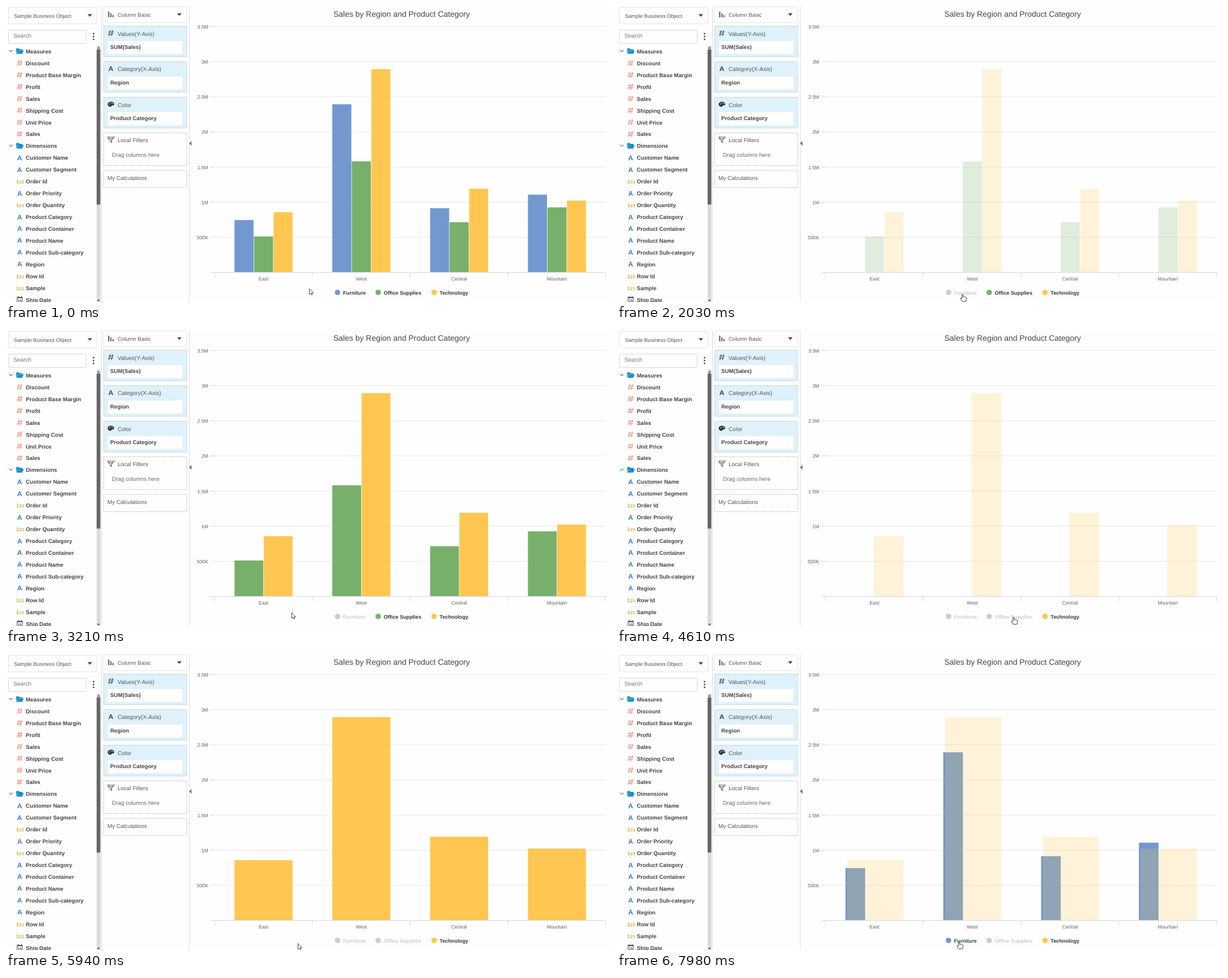
Recreate the animation shown at these times as an HTML page. Size 1068 px wide and 524 px high, loop 8 s.

```html
<!DOCTYPE html>
<html lang="en">
<head>
<meta charset="utf-8">
<title>Sales by Region and Product Category</title>
<style>
html, body { margin: 0; width: 100%; height: 100%; overflow: hidden; background: #fefefe; }
svg { display: block; width: 1068px; height: 524px; }
text { font-family: "Liberation Sans", Arial, sans-serif; fill: #555; white-space: pre; text-rendering: geometricPrecision; }
.heavy { font-weight: bold; fill: #444; }
.axis { fill: #606060; }
</style>
</head>
<body>
<svg id="stage" viewBox="0 0 1068 524" xmlns="http://www.w3.org/2000/svg"></svg>
<script>
const stage = document.getElementById('stage');
const parts = [];
const add = markup => parts.push(markup);
const text = (x, y, str, size, attrs = '') =>
  add(`<text x="${x}" y="${y}" font-size="${size}" ${attrs}>${str}</text>`);
const heavy = (x, y, str) => text(x, y, str, 9.75, 'class="heavy"');
const box = (x, y, w, h, fill, stroke = 'none', attrs = '') =>
  add(`<rect x="${x}" y="${y}" width="${w}" height="${h}" fill="${fill}" stroke="${stroke}" ${attrs}/>`);
const path = (d, fill, stroke = 'none', attrs = '') =>
  add(`<path d="${d}" fill="${fill}" stroke="${stroke}" ${attrs}/>`);
const caret = (x, y) => path(`M${x - 4} ${y - 2.5}h8l-4 4.5z`, '#444');
const hash = (x, y, color) =>
  path(`M${x - 1} ${y - 5}l-2.4 10M${x + 3.4} ${y - 5}l-2.4 10M${x - 4} ${y - 2}h9M${x - 5} ${y + 2}h9`,
    'none', color, 'stroke-width="1.1"');
const letterA = (x, y, color) =>
  text(x, y + 4.2, 'A', 12, `class="heavy" text-anchor="middle" style="fill:${color}"`);

// Panels
path('M168.5 0V524M323.5 0V524', 'none', '#dcdcdc');
box(4.5, 2.5, 156, 29, '#fefefe', '#e4e4e4', 'rx="2"');
text(14, 20.5, 'Sample Business Object', 9.3);
caret(148, 17);
box(4.5, 42.5, 137, 24, '#fefefe', '#d8d8d8', 'rx="1"');
text(13, 56.3, 'Search', 10.1, 'style="fill:#777"');
for (const y of [49, 54, 59]) add(`<circle cx="154.5" cy="${y}" r="1.4" fill="#444"/>`);

// Tree
const measures = ['Discount', 'Product Base Margin', 'Profit', 'Sales', 'Shipping Cost', 'Unit Price', 'Sales'];
const dimensions = ['Customer Name', 'Customer Segment', '1Order Id', 'Order Priority', '1Order Quantity',
  'Product Category', 'Product Container', 'Product Name', 'Product Sub-category', 'Region', '1Row Id',
  '1Sample', '@Ship Date'];
let row = 0;
const nextRow = () => 80 + 20.95 * row++;
function folder(name) {
  const y = nextRow();
  path(`M5.5 ${y - 2}l3 3 3-3`, 'none', '#2a9bd5', 'stroke-width="1.3"');
  path(`M18 ${y + 4.5}v-9.5h4.5l1.5 1.5h5v2h-8z`, '#1b8fcf');
  path(`M18.5 ${y + 4.8}l3-6.3h10l-3 6.3z`, '#1b8fcf');
  heavy(35, y + 3.8, name);
}
folder('Measures');
for (const name of measures) {
  const y = nextRow();
  hash(24, y, '#f58476');
  heavy(35, y + 3.8, name);
}
folder('Dimensions');
for (const name of dimensions) {
  const y = nextRow(), kind = name[0];
  if (kind === '1') {
    text(18, y + 3.6, '1<tspan font-size="7.500">23</tspan>', 9.5, 'class="heavy" style="fill:#d9ab3c"');
  } else if (kind === '@') {
    box(19.5, y - 4.5, 9.5, 10, '#fff', '#555');
    path(`M19.5 ${y - 3.5}h9.5M22 ${y - 6}v2M27 ${y - 6}v2`, 'none', '#555', 'stroke-width="1.5"');
    text(24.2, y + 4, '15', 6.5, 'class="heavy" text-anchor="middle"');
  } else letterA(24, y, '#3a7fbf');
  heavy(35, y + 3.8, name.replace(/^[1@]/, ''));
}
box(160, 70, 7, 454, '#dcdcdc');
box(160, 77, 6.5, 274.5, '#666');
path('M161 75.5l2.3-3 2.3 3zM161 520l2.3 3 2.3-3z', '#444');

// Chart settings
box(172.5, 1.5, 146, 28, '#fefefe', '#e4e4e4', 'rx="2"');
path('M180 10h2.6v10h-2.6zM184 13h2.4v7h-2.4zM187.8 16h2.4v4h-2.4z', '#777');
text(197, 18.8, 'Column Basic', 9.5);
caret(306, 15.5);
function card(y, label, value) {
  box(172.5, y, 146.5, 54.5, '#dff1fa', '#c3d9e4');
  box(180, y + 26.5, 131.5, 23, '#fefefe', 'none', 'rx="1"');
  text(197, y + 17, label, 10.1);
  heavy(184, y + 40.6, value);
}
card(35.5, 'Values(Y-Axis)', 'SUM(Sales)');
card(98.3, 'Category(X-Axis)', 'Region');
card(161.5, 'Color', 'Product Category');
hash(185, 48, '#444');
letterA(185, 111, '#444');
path('M179.5 174c0-3 3-4.5 6-4.5s5.5 2 5.5 4.3-2 2.2-3.6 2.2-1 2.5-2.8 2.5-5.1-1.5-5.1-4.5z', '#333');
path('M182 173.5h1.5M184.5 171.7h1.5M187.5 172.5h1.5', 'none', '#dff1fa', 'stroke-width="1.3"');
for (const [y, h] of [[224.5, 58], [291, 30.5]])
  box(172.5, y, 146.5, h, 'none', '#b4b4b4', 'stroke-dasharray="2 1.5"');
path('M179.5 232h11.5l-4.5 5v4.5l-2.5-1.5v-3zM179.5 235.5l9-1', 'none', '#555', 'stroke-width="1.1"');
text(197, 241.3, 'Local Filters', 10);
text(187, 266.5, 'Drag columns here', 9.95, 'style="fill:#666"');
text(179, 307.8, 'My Calculations', 9.9);
path('M327.5 239v8.5l-4.5-4.25z', '#777');

// Chart frame
const baseY = 471.7, unit = 62.2, groupX = 403, pitch = 172.65, groupW = 103.3;
text(698.5, 19.3, 'Sales by Region and Product Category', 13.95, 'text-anchor="middle" style="fill:#444"');
['500K', '1M', '1.5M', '2M', '2.5M', '3M', '3.5M'].forEach((label, i) => {
  const y = baseY - unit * (i + 1);
  path(`M361 ${y}H1059`, 'none', '#e6e6e6');
  path(`M361 ${y}h7`, 'none', '#d4d8de');
  text(357, y + 3.4, label, 8.7, 'class="axis" text-anchor="end"');
});
add('<g id="bars"></g>');
path(`M361 ${baseY}H1059` + [0, 1, 2, 3, 4].map(i => `M${368 + i * pitch} ${baseY}v8`).join(''), 'none', '#cfd5df');
['East', 'West', 'Central', 'Mountain'].forEach((label, i) =>
  text(454.6 + i * pitch, 486, label, 8.6, 'class="axis" text-anchor="middle"'));

const series = [
  { name: 'Furniture', color: '#7299cf', x: 585.2, from: 596, to: 636, tops: [379, 174, 358, 334] },
  { name: 'Office Supplies', color: '#77b06a', x: 657, from: 667, to: 735, tops: [408, 275, 382.7, 356.5] },
  { name: 'Technology', color: '#ffc751', x: 755.7, from: 765, to: 817, tops: [365, 111.7, 323.5, 344.5] }
];
for (const s of series) {
  add(`<circle class="dot" cx="${s.x}" cy="507" r="4.8"/>`);
  text(s.x + 9.8, 510.6, s.name, 9.15, 'class="heavy legend"');
}
add('<circle id="ring" r="8.5" fill="none" stroke="#999" stroke-opacity=".6"/>');
add(`<path id="arrow" fill="#fff" stroke="#333" stroke-width=".9"
  d="M.5 .5V10.5L2.9 8.4 4.4 11.7 5.9 11 4.5 7.9H7.5Z"/>`);
add(`<path id="hand" fill="#fff" stroke="#222" stroke-width=".9" stroke-linejoin="round"
  d="M-1 7V1Q0-.6 1 1V5Q2.3 4 3.2 5.3 4.5 4.5 5.2 5.8 6.8 5.3 6.9 7V9.5L5.6 13H-.4L-3.9 8.5Q-4 6.5-2.3 7L-1 8.3Z"/>`);
stage.innerHTML = parts.join('');

const byId = id => document.getElementById(id);
byId('bars').innerHTML = series.map(s => `<path fill="${s.color}"/>`).join('');
const bars = byId('bars').children;
const dots = stage.querySelectorAll('.dot'), labels = stage.querySelectorAll('.legend');

// Motion
const loop = 8000, stepMs = 80, dimmed = .22;
const bursts = [[0, 0], [610, 1330], [2030, 2510], [3210, 3600], [4570, 4570],
  [4610, 5320], [5940, 6490], [7200, 7360], [7900, 7980]];
const clicks = [[1800, 2030], [4300, 4570], [6720, 6880], [7670, 7900]];
const pointer = [[0, 535, 500], [530, 535, 500], [1170, 612, 512], [1330, 610, 510], [2030, 610, 510],
  [2430, 498, 503], [2510, 500, 503], [3130, 500, 503], [3210, 504, 500], [3600, 700, 508],
  [4690, 700, 508], [4930, 580, 500], [5320, 500, 506], [5860, 500, 506], [5940, 515, 512],
  [6340, 602, 508], [6490, 594.5, 508.5], [7120, 594.5, 508.5], [7360, 604, 509], [loop, 604, 509]];
const dimming = [[0, 0], [1010, 0], [1170, 1], [2150, 1], [2350, 0], [3440, 0], [3600, 1],
  [4830, 1], [4930, .19], [5010, 0], [7899, 0], [7900, 1], [loop, 1]];

const mix = (a, b, p) => a + (b - a) * p;
const clamp = p => Math.min(1, Math.max(0, p));
const ease = (t, start, ms) => (1 - Math.cos(Math.PI * clamp((t - start) / ms))) / 2;
const smooth = p => p * p * (3 - 2 * p);

// The picture advances in steps during each burst and rests between them.
function held(t) {
  const [start, end] = bursts.filter(b => b[0] <= t).pop();
  return t >= end ? end : start + Math.floor((t - start) / stepMs) * stepMs;
}
function track(keys, t, shape = p => p) {
  const i = Math.max(1, keys.findIndex(k => k[0] >= t));
  const a = keys[i - 1], b = keys[i], p = shape(clamp((t - a[0]) / (b[0] - a[0])));
  return a.slice(1).map((v, k) => mix(v, b[k + 1], p));
}
function barPath(tops, left, right) {
  return tops.map((top, i) => {
    const x = groupX + i * pitch, x1 = x + left * groupW + .4, x2 = x + right * groupW - .4;
    return `M${x1} ${top}H${x2}V${baseY - .4}H${x1}Z`;
  }).join('');
}

function draw(now) {
  const real = now % loop, t = held(real);
  const two = ease(t, 2030, 480), one = ease(t, 4545, 545), back = ease(t, 7903, 500);
  const spans = [
    [0, mix(1 / 3, 1 / 2, back)],
    [mix(1 / 3, 0, two), mix(2 / 3, 1 / 2, two)],
    [mix(mix(mix(2 / 3, 1 / 2, two), 0, one), 1 / 2, back), 1]
  ];
  const visible = [t < 2030 || t >= 7900, t < 4570, true];
  const hiddenAt = [2030, 4570, Infinity];
  const focus = t < 3000 || t > 7000 ? 0 : 1;
  const [dim] = track(dimming, t);
  const [x, y] = track(pointer, t, smooth);
  let pointing = false;

  series.forEach((s, i) => {
    const hot = x >= s.from && x <= s.to;
    const justHidden = t >= hiddenAt[i] && t < hiddenAt[i] + 300;
    pointing = pointing || hot;
    bars[i].setAttribute('d', visible[i] ? barPath(s.tops, ...spans[i]) : '');
    bars[i].setAttribute('opacity', i === focus ? 1 : mix(1, dimmed, dim));
    dots[i].setAttribute('fill', visible[i] ? s.color : '#ccc');
    labels[i].style.fill = hot && !justHidden ? '#2b4a35' : visible[i] ? '#333' : '#ccc';
  });

  for (const id of ['arrow', 'hand', 'ring']) byId(id).setAttribute('transform', `translate(${x} ${y})`);
  byId('hand').style.display = pointing ? '' : 'none';
  byId('arrow').style.display = pointing ? 'none' : '';
  byId('ring').style.display = clicks.some(([a, b]) => real >= a && real < b) ? '' : 'none';
}

const began = performance.now();
function tick() {
  draw(performance.now() - began);
  requestAnimationFrame(tick);
}
tick();
</script>
</body>
</html>
```
